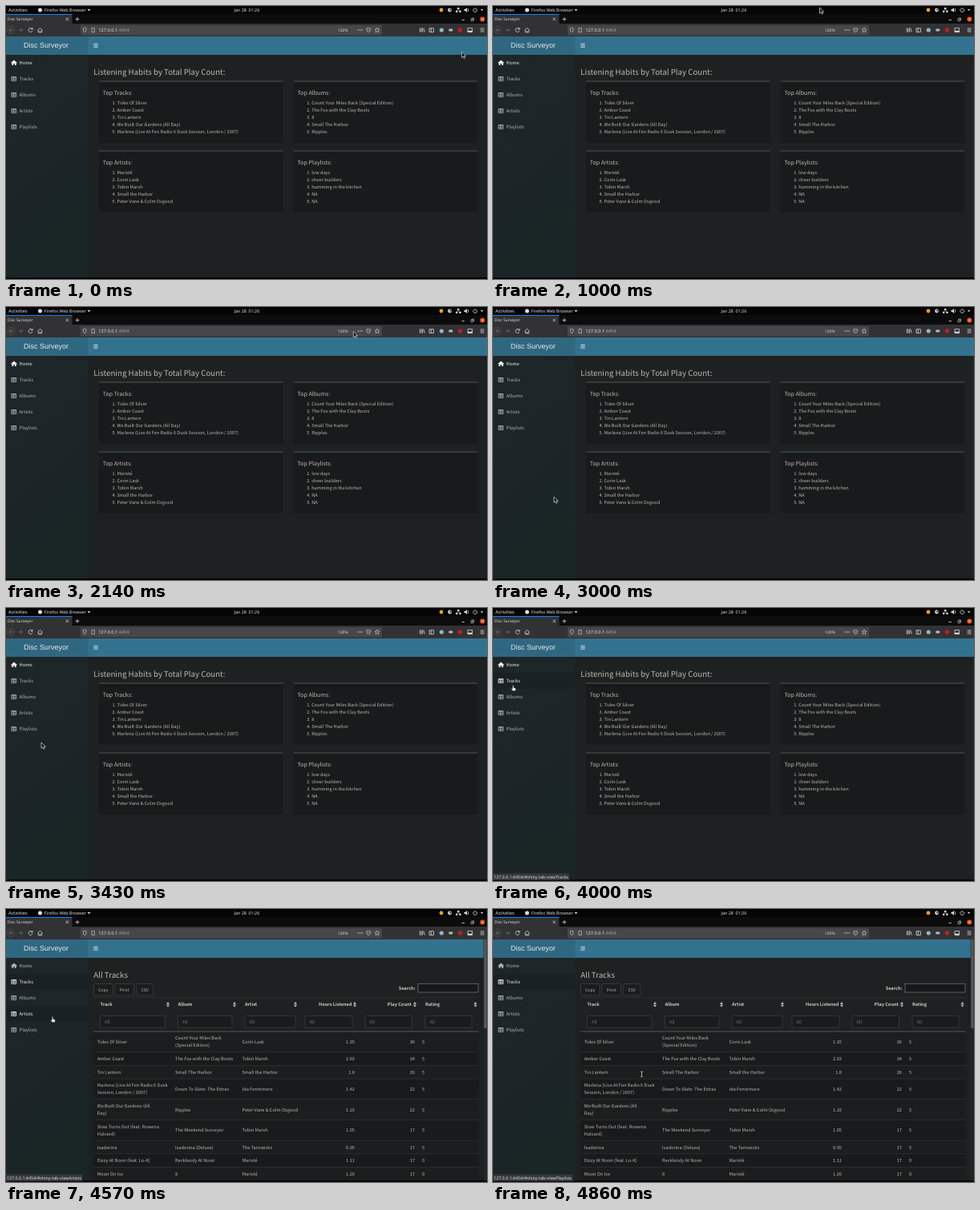
An HTML page that plays this animation: 600x341 px, repeating every 5010 ms.

```html
<!DOCTYPE html>
<html lang="en">
<head>
<meta charset="utf-8">
<style>
html, body { margin: 0; width: 100%; height: 100%; overflow: hidden; background: #000; }
svg { display: block; width: 600px; height: 341px; }
text {
  white-space: pre; fill: #bcb8b0; text-rendering: geometricPrecision;
  font: 5.65px "Noto Sans CJK JP", "Noto Sans CJK SC", "Noto Sans", sans-serif;
}
.ui { font-family: "Noto Sans", "Open Sans", sans-serif; fill: #e4e4e4; }
.logo { font-family: "Liberation Sans", Arial, sans-serif; fill: #e6eaec; }
.b { font-weight: 700; fill: #d0ccc5; }
.line { fill: none; stroke: #d8d8d8; stroke-width: .8; }
</style>
</head>
<body>
<svg id="stage" viewBox="0 0 600 341"></svg>
<script>
const rect = (x, y, w, h, fill, extra = '') =>
  `<rect x="${x}" y="${y}" width="${w}" height="${h}" fill="${fill}" ${extra}/>`;
const text = (x, y, s, extra = '') =>
  `<text x="${x}" y="${y}" ${extra}>${s.replace(/&/g, '&amp;')}</text>`;
const size = n => `style="font-size:${n}px"`;
const ui = (x, y, s, n, fill = '#e4e4e4') =>
  text(x, y, s, `class="ui" style="font-size:${n}px;fill:${fill}"`);
const line = (d, extra = '') => `<path class="line" d="${d}" ${extra}/>`;
const shape = (d, fill, extra = '') => `<path d="${d}" fill="${fill}" ${extra}/>`;
const dot = (x, y, r, fill) => `<circle cx="${x}" cy="${y}" r="${r}" fill="${fill}"/>`;
const group = (id, body) => `<g id="${id}">${body}</g>`;
const right = 'text-anchor="end"';

function desktop() {
  return rect(0, 0, 600, 10, '#050505') +
    ui(3, 7.2, 'Activities', 5.7) + dot(42.5, 5, 2.5, '#dedede') +
    ui(48, 7.2, 'Firefox Web Browser', 5.35) + shape('M101.5 4h4l-2 2.4z', '#ccc') +
    ui(284.5, 7.2, 'Jan 28  01:26', 5.35) +
    dot(543, 5, 2.4, '#f0a020') + dot(553.5, 5, 2.4, '#cfcfcf') + dot(554.3, 4.4, 1, '#222') +
    shape('M563 2h2.4v2h-2.4zM561 6h2.3v2H561zM565.3 6h2.3v2h-2.3z', '#ddd') +
    line('M564.2 4v1.2M562 6v-.8h4.5V6', 'style="stroke-width:.5"') +
    shape('M571.5 4h1.5l2-2v6l-2-2h-1.5z', '#ddd') + line('M576 3q1.6 2 0 4') +
    line('M583.8 3.2a2.4 2.4 0 1 0 2.8 0M585.2 2v2.6') + shape('M592 4h3.4l-1.7 2.2z', '#ccc');
}

function browser() {
  const thin = 'style="stroke-width:.6"';
  return rect(0, 10, 600, 12, '#0c0c0d') + rect(0, 10, 82.5, 12, '#323234') +
    rect(0, 10, 82.5, 1, '#0a84ff') + ui(2, 18.3, 'Disc Surveyor', 4.95) +
    line('M74.7 14.7l3.4 3.4M78.1 14.7l-3.4 3.4M86.5 16.4h5M89 13.9v5') +
    line('M568.5 17.5h3.4') + line('M580 16.2h2.6v2.6H580zM581 16v-1h2.7v2.6h-1', thin) +
    dot(594.3, 16.6, 3, '#e95420') + line('M593.2 15.5l2.2 2.2M595.4 15.5l-2.2 2.2', thin) +
    rect(0, 22, 600, 16, '#323234') +
    '<circle cx="6.2" cy="30" r="5" fill="#38383a" stroke="#505052" stroke-width=".6"/>' +
    line('M8.7 30H4M6 28l-2 2 2 2M15.7 30h4.8M18.5 28l2 2-2 2', 'style="stroke:#707072"') +
    line('M32.8 28.8a2.5 2.5 0 1 0 .2 2M33.1 27v2.1h-2') +
    line('M39.5 30.2l3-2.8 3 2.8M40.3 29.8v3h4.4v-3M42.5 33v-2') +
    rect(93, 24, 376, 12.6, '#474749', 'rx="1"') +
    line('M96.2 28l2-.8 2 .8q0 3.8-2 5-2-1.2-2-5z', thin) +
    line('M107 27.6h3.4v5H107z', thin) +
    text(115.2, 32.2, '127.0.0.1<tspan fill="#a2a2a4">:4454</tspan>', 'class="ui" style="font-size:5.7px"') +
    ui(414, 32, '120%', 4.9) +
    [439.3, 441.7, 444.1].map(x => dot(x, 30, .75, '#d0d0d0')).join('') +
    line('M449.8 27.8h4.8v2q-.4 2.6-2.4 2.8-2-.2-2.4-2.8zM451 29.4l1.2 1.2 1.2-1.2', thin) +
    line('M463 27l.9 2 2.1.2-1.6 1.4.5 2.2-1.9-1.2-1.9 1.2.5-2.2-1.6-1.4 2.1-.2z', thin) +
    line('M516.3 27.4v5.3M518 27.4v5.3M519.6 27.4v5.3M520.8 27.6l1.5 5') +
    line('M528 27.8h5.4v4.8H528zM530.3 28v4.5') +
    dot(543.3, 30, 2.6, '#8fb6cc') + rect(552.3, 28.6, 5, 2.8, '#b8b8ba', 'rx="1"') +
    dot(566.5, 30, 2.7, '#b8202c') +
    line('M576 27.6h5.6v5H576z') + rect(576, 30.8, 5.6, 1.8, '#d8d8d8') +
    line('M591.7 28h4.8M591.7 30h4.8M591.7 32h4.8');
}

const tabs = ['Home', 'Tracks', 'Albums', 'Artists', 'Playlists'];

function sidebar() {
  const items = tabs.map((name, i) => {
    const y = 71 + 20 * i;
    const icon = i
      ? `<path fill="none" stroke="currentColor" stroke-width=".8" d="M6.9 ${y - 2.5}h5.8v5h-5.8zM7 ${y - 1.8}h5.6M7 ${y + .4}h5.6M9.8 ${y - 2}v4.4"/>`
      : `<path fill="currentColor" d="M6 ${y}l4-3.5 4 3.5-.6.5-.7-.6v3h-1.9v-2H9.2v2H7.3v-3l-.7.6z"/>`;
    return `<g class="item">${rect(0, y - 10, 102.5, 20, '#1a2124')}${icon}` +
      text(16.5, y + 2, name, 'style="fill:currentColor;font-size:5.8px"') + '</g>';
  }).join('');
  return rect(0, 61, 102.5, 279, 'url(#side)') + items;
}

function header() {
  return rect(0, 38, 600, 23, '#33728e') + rect(0, 38, 102.5, 23, '#306780') +
    text(22, 51.5, 'Disc Surveyor', 'class="logo" style="font-size:9px"') +
    line('M109.3 47.3h5.4M109.3 49.3h5.4M109.3 51.3h5.4', 'style="stroke:#eee"');
}

const album = 'Count Your Miles Back', marlena = 'Marlena (Live At Fen Radio 6 Dusk';
const lists = [
  ['Top Tracks:', 'Tides Of Silver', 'Amber Coast', 'Tin Lantern', 'We Built Our Gardens (All Day)',
    marlena + ' Session, London / 2007)'],
  ['Top Albums:', album + ' (Special Edition)', 'The Fox with the Clay Boots', '8', 'Small The Harbor', 'Ripples'],
  ['Top Artists:', 'Maristé', 'Corin Lask', 'Tobin Marsh', 'Small the Harbor', 'Peter Vane & Colm Osgood'],
  ['Top Playlists:', 'low days', 'cheer builders', 'humming in the kitchen', 'NA', 'NA']
];

function home() {
  return text(109.3, 86.4, 'Listening Habits by Total Play Count:', size(9.7)) +
    lists.map(([title, ...names], i) => {
      const x = 116 + i % 2 * 242.7, y = 93.5 + (i >> 1) * 87;
      return rect(x, y, 229.5, 77.5, '#181a1b') + rect(x, y, 229.5, 1, '#55585a') +
        text(x + 4.7, y + 17.2, title, size(7.1)) +
        names.map((name, j) => text(x + 16.5, y + 29.8 + 9 * j, `${j + 1}. ${name}`)).join('');
    }).join('');
}

// Column: title, left edge of the filter box, its width, sort icon x
const columns = [
  ['Track', 117.5, 80.5, 202], ['Album', 214.5, 67.5, 285], ['Artist', 298, 63, 361],
  ['Hours Listened', 373, 59, 435], ['Play Count', 448, 58.5, 510], ['Rating', 523, 58, 585.5]
];
// Row: track, album, artist, hours, plays, rating; | breaks a line
const rows = [
  ['Tides Of Silver', album + '|(Special Edition)', 'Corin Lask', 1.35, 36, 5],
  ['Amber Coast', 'The Fox with the Clay Boots', 'Tobin Marsh', 2.03, 34, 5],
  ['Tin Lantern', 'Small The Harbor', 'Small the Harbor', 1.8, 26, 5],
  [marlena + '|Session, London / 2007)', 'Down To Slate: The Extras', 'Ida Fennimore', 1.42, 22, 5],
  ['We Built Our Gardens (All|Day)', 'Ripples', 'Peter Vane & Colm Osgood', 1.16, 22, 5],
  ['Slow Turns Out (feat. Rowena|Halvard)', 'The Weekend Surveyor', 'Tobin Marsh', 1.05, 17, 5],
  ['Isadorina', 'Isadorina (Deluxe)', 'The Tarnwicks', .95, 17, 5],
  ['Dizzy At Noon (feat. Lo-K)', 'Recklessly At Noon', 'Maristé', 1.11, 17, 0],
  ['Moon On Ice', '8', 'Maristé', 1.26, 17, 0]
];

function tracks() {
  let out = text(109.3, 86.4, 'All Tracks', size(9.7));
  [['Copy', 109.5, 23.5], ['Print', 136, 23.5], ['CSV', 162.7, 21]].forEach(([label, x, w]) => {
    out += rect(x, 93.5, w, 14.5, '#1a1c1d', 'rx="1" stroke="#484b4d" stroke-width=".6"') +
      text(x + w / 2, 102.8, label, 'text-anchor="middle" style="font-size:5.2px"');
  });
  out += text(510.5, 101, 'Search:', `class="b" ${right}`) +
    rect(514, 93.3, 75, 10.7, '#151718', 'stroke="#777a7c" stroke-width=".7"') +
    rect(109.3, 110, 480, .6, '#35383a');
  columns.forEach(([title, x, w, icon], i) => {
    const numeric = i == 3 || i == 4;
    out += text(numeric ? x + w - .5 : x, 121.2, title, `class="b" ${numeric ? right : ''}`) +
      shape(`M${icon - 2} 118.7l2-2.6 2 2.6zM${icon - 2} 119.8h4l-2 2.6z`, '#c4c4c2') +
      rect(x, 133.7, w, 14.5, '#191b1c', 'stroke="#3c3f41" stroke-width=".7"') +
      text(x + 5.5, 143, 'All', 'style="fill:#74716c"');
  });
  let y = 153;
  const left = [113.7, 211, 294.5, 435, 510, 519];
  rows.forEach((row, n) => {
    const h = row.some(c => String(c).includes('|')) ? 25.7 : 16.7;
    out += rect(109.3, y, 480, h, n % 2 ? '#181a1b' : '#1b1d1e') +
      rect(109.3, y - .4, 480, n ? .6 : .9, n ? '#35383a' : '#5c5f60');
    row.forEach((cell, i) => {
      const parts = String(cell).split('|');
      parts.forEach((part, j) => {
        const base = y + h / 2 + 2 + (j - (parts.length - 1) / 2) * 9;
        out += text(left[i], base, part, i == 3 || i == 4 ? right : '');
      });
    });
    y += h;
  });
  return out + rect(595.7, 38, 4.3, 302, '#222526') + rect(596.2, 38, 3.4, 111, '#53585a');
}

const outline = 'stroke="#ddd" stroke-width=".7" stroke-linejoin="round"';
const pointers = {
  arrow: shape('M0 0v7.2l1.7-1.5 1.1 2.5 1.3-.6-1.1-2.4h2.3z', '#111', outline),
  hand: shape('M-.7 0q.8-.8 1.5 0v2.4l2 .6q.7.3.6 1l-.5 2.4h-3.4l-1.7-2.3q0-1 1.5-.1z', '#f6f6f6',
    'stroke="#111" stroke-width=".4"'),
  beam: line('M-1.4-.2q1.4 0 1.4.7 0-.7 1.4-.7M0 .5v5M-1.4 6.2q1.4 0 1.4-.7 0 .7 1.4.7')
};

const stage = document.getElementById('stage');
stage.innerHTML = `<defs><linearGradient id="side" x2=".3" y2="1">
  <stop stop-color="#1e2628"/><stop offset="1" stop-color="#1a2526"/></linearGradient></defs>` +
  rect(0, 38, 600, 301.5, '#1e2121') + group('home', home()) + sidebar() + header() +
  group('tracks', tracks()) + rect(0, 339.3, 600, 1.7, '#050505') + browser() + desktop() +
  group('status', rect(0, 331.5, 96, 8.5, '#38383a', 'id="statusBox"') + ui(1, 337.6, '', 5.3)) +
  group('pointer', Object.entries(pointers).map(([id, body]) => group(id, body)).join(''));

const el = id => document.getElementById(id);
const show = (node, on) => node.style.display = on ? '' : 'none';
const items = document.querySelectorAll('.item');
const label = el('status').querySelector('text');

const LOOP = 5010, STEPS = 35, OPEN = 29;
// Pointer path: step, x, y
const path = [
  [0, 568.5, 57.3], [1, 562, 60], [2, 562, 60], [3, 535, 53], [5, 462, 22], [7, 407.5, 2], [8, 409, 4],
  [10, 424, 17], [12, 433, 28], [15, 433.3, 30.5], [16, 410, 46], [17, 345, 88], [18, 265, 145],
  [19, 190, 190], [20, 120, 222], [21, 76, 237], [22, 66, 225], [24, 44, 168], [26, 28, 112],
  [27, 25, 97], [29, 25, 97], [30, 26, 101], [31, 35, 115], [32, 58, 135], [33, 97, 157], [34, 185.5, 203.3]
];

function pointerAt(step) {
  const i = Math.max(1, path.findIndex(p => p[0] >= step));
  const [s0, x0, y0] = path[i - 1], [s1, x1, y1] = path[i];
  const u = (step - s0) / (s1 - s0);
  return [x0 + (x1 - x0) * u, y0 + (y1 - y0) * u];
}

function hovered(step) {
  const [x, y] = pointerAt(step), row = Math.floor((y - 61) / 20);
  return x < 102 && row >= 0 && row < 5 ? row : -1;
}

function draw(step) {
  const open = step >= OPEN, [x, y] = pointerAt(step), hover = hovered(step);
  show(el('home'), !open);
  show(el('tracks'), open);
  items.forEach((item, i) => {
    const active = i == (open ? 1 : 0);
    item.style.color = active || i == hover ? '#efefed' : '#aeb5b6';
    show(item.firstChild, i == hover || active && open);
  });

  // The link hint lingers briefly after the pointer leaves
  const link = [step, step - 1, step - 2].filter(s => s >= 0).map(hovered).find(r => r >= 0);
  show(el('status'), link !== undefined);
  if (link !== undefined) {
    label.textContent = '127.0.0.1:4454/#shiny-tab-view' + tabs[link];
    el('statusBox').setAttribute('width', label.getComputedTextLength() + 2.5);
  }

  const kind = hover >= 0 ? 'hand' : open ? 'beam' : 'arrow';
  Object.keys(pointers).forEach(id => show(el(id), id == kind));
  el('pointer').setAttribute('transform', `translate(${x} ${y})`);
}

const start = performance.now();
function tick() {
  const t = (performance.now() - start) % LOOP;
  draw(Math.min(STEPS - 1, Math.floor((t + 12) / LOOP * STEPS)));
  requestAnimationFrame(tick);
}
tick();
</script>
</body>
</html>
```
